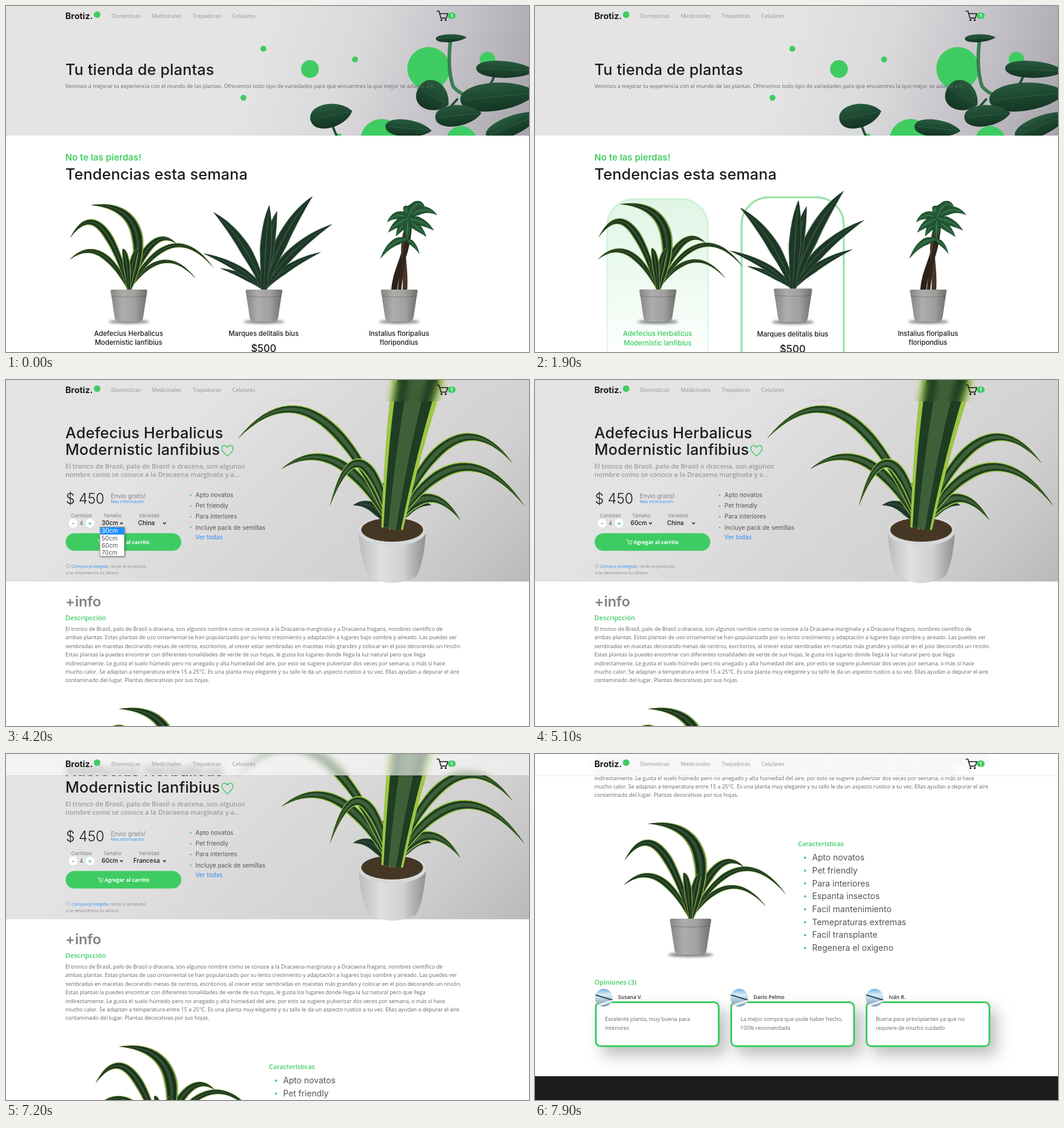
Write an HTML page with a canvas that moves like this. It is 881 by 582 pixels and loops after 8 s.

```html
<!DOCTYPE html>
<html lang="es">
<head>
<meta charset="utf-8">
<title>Tienda de plantas</title>
<style>
html, body { margin: 0; width: 100%; height: 100%; overflow: hidden; background: #fff; }
canvas { display: block; width: 100%; height: 100%; }
</style>
</head>
<body>
<canvas id="stage" width="881" height="582"></canvas>
<script>
const W = 881, H = 582, LOOP = 8000;
const GREEN = '#3ecc62', BLUE = '#2b8ff5', INK = '#1c1c1c', GREY = '#666', PALE = '#8c8c8c';
const screen = document.getElementById('stage').getContext('2d');
let g = screen;

// ---------- helpers ----------
const head = (size, weight = 400) => `${weight} ${size}px Inter, sans-serif`;
const body = (size, weight = 400) => `${weight} ${size}px "Open Sans", sans-serif`;
const clamp = (x, lo = 0, hi = 1) => Math.min(hi, Math.max(lo, x));
const within = (t, a, b) => t >= a && t < b;

function text(str, x, y, font, color, align = 'left') {
  g.font = font;
  g.fillStyle = color;
  g.textAlign = align;
  g.fillText(str, x, y);
}

function title(str, x, y, size, weight, color) {
  g.letterSpacing = '0.2px';
  text(str, x, y, head(size, weight), color);
  g.letterSpacing = '0px';
}

function oval(x, y, rx, ry, color) {
  g.fillStyle = color;
  g.beginPath();
  g.ellipse(x, y, rx, ry, 0, 0, 7);
  g.fill();
}
const disc = (x, y, r, color) => oval(x, y, r, r, color);

function rect(x, y, w, h, color, r = 0) {
  g.fillStyle = color;
  g.beginPath();
  g.roundRect(x, y, w, h, r);
  g.fill();
}

function outline(x, y, w, h, r, color, width) {
  g.strokeStyle = color;
  g.lineWidth = width;
  g.beginPath();
  g.roundRect(x, y, w, h, r);
  g.stroke();
}

function line(path, color, width) {
  g.strokeStyle = color;
  g.lineWidth = width;
  g.lineCap = g.lineJoin = 'round';
  g.stroke(new Path2D(path));
}

function ramp(x0, y0, x1, y1, ...colors) {
  const grad = g.createLinearGradient(x0, y0, x1, y1);
  colors.forEach((c, i) => grad.addColorStop(i / (colors.length - 1), c));
  return grad;
}

function at(x, y, scale, draw) {
  g.save();
  g.translate(x, y);
  g.scale(scale, scale);
  draw();
  g.restore();
}

function layer(height, draw) {
  const c = document.createElement('canvas');
  c.width = W;
  c.height = height;
  g = c.getContext('2d');
  draw();
  g = screen;
  return c;
}

// ---------- plants ----------
const STRIPED = [[1, '#7fa043'], [0.76, '#19321d'], [0.25, '#31502f']];
const VIVID = [[1, '#9dc644'], [0.8, '#1f3d22'], [0.36, '#3d6038']];
const DARK = [[1, '#41604a'], [0.86, '#1d3727'], [0.12, '#34513e']];
const LEAFY = [[1, '#1d4a2c'], [0.75, '#255a36'], [0.1, '#4c8259']];

// Tapered blade from the origin to a tip; lift bends it upward, sway sideways.
function blade(tones, tx, ty, lift = 0, sway = 0, width = 6 + 0.11 * Math.abs(ty)) {
  const bx = 0.25 * tx + sway, cx = 0.6 * tx + sway, cy = ty - lift, by = 0.6 * cy;
  const N = 28, left = [], right = [];
  for (let i = 0; i <= N; i++) {
    const u = i / N, v = 1 - u;
    const point = (b, c, d) => 3 * v * v * u * b + 3 * v * u * u * c + u * u * u * d;
    const slope = (b, c, d) => v * v * b + 2 * v * u * (c - b) + u * u * (d - c);
    const dx = slope(bx, cx, tx), dy = slope(by, cy, ty);
    const half = width / 2 * Math.min(1, 0.4 + 1.5 * u) * (1 - u ** 3) / (Math.hypot(dx, dy) || 1);
    const x = point(bx, cx, tx), y = point(by, cy, ty);
    left.push([x, y, -dy * half, dx * half]);
    right.unshift([x, y, dy * half, -dx * half]);
  }
  for (const [k, color] of tones) {
    g.beginPath();
    [...left, ...right].forEach(([x, y, nx, ny]) => g.lineTo(x + nx * k, y + ny * k));
    g.fillStyle = color;
    g.fill();
  }
}

function dracena() {
  // tip x, tip y, lift, sway
  [[-100, -50, 36], [113, -18, 54], [143, -36, 74], [80, -77, 28],
    [-99, -87, 64], [-64, -142, 3, 50], [17, -68], [-11, -68]]
    .forEach(tip => blade(STRIPED, ...tip));
}

function agave() {
  [[-74, -36], [-102, -61], [96, -63], [115, -110], [-85, -130], [82, -157], [22, -132], [9, -142]]
    .forEach(([x, y]) => blade(DARK, x, y, 0.22 * y));
}

function pachira() {
  line('M-9 4C-6 -40 14 -50 17 -118', '#2c2019', 10);
  line('M9 4C14 -40 -2 -60 15 -112', '#4a3628', 8);
  line('M0 4C4 -40 10 -60 13 -90', '#33251b', 6);
  at(12, -85, 1, () => {
    blade(LEAFY, -44, 33, 30, 0, 13);
    blade(LEAFY, 22, 25, 18, 0, 9);
  });
  at(14, -120, 1, () => {
    for (let i = 0; i < 10; i++) {
      const a = 2.4 + 2.4 * i, r = 40 + 8 * Math.sin(5 * i);
      blade(LEAFY, 10 + r * Math.cos(a), 12 + 0.68 * r * Math.sin(a), 16, 0, 15);
    }
  });
}

function potted(leaves) {
  leaves();
  g.filter = 'blur(2px)';
  oval(0, 54, 34, 3, 'rgba(0,0,0,.55)');
  g.filter = 'none';
  g.fillStyle = ramp(-31, 0, 31, 0, '#858684', '#adaeac', '#a0a19f', '#6d6e6c');
  g.fill(new Path2D('M-31 2Q-31 0 -28 0H28Q31 0 31 2L29 14L24 47Q23 54 14 54H-14Q-23 54 -24 47L-29 14Z'));
  line('M-29 11Q0 14 29 11', 'rgba(60,60,60,.35)', 1);
}

function bigPlant() {
  g.fillStyle = ramp(-57, 0, 57, 0, '#b9bcbc', '#dfe1e1', '#cfd1d1', '#8d9090');
  g.fill(new Path2D('M-57 2C-55 40 -47 68 -39 81Q0 102 40 81C49 66 55 40 57 2Z'));
  oval(0, 4, 57, 25, '#d6d8d8');
  oval(0, 2, 52, 20, '#463626');
  for (let i = -3; i <= 3; i++) blade(DARK, 22 * i, -75 + 4 * i * i, 10, 0, 20);
  [[-187, -100, 55], [-260, -151, 118], [115, -14, 66], [223, -38, 120], [-105, -38, 130], [203, -110, 100]]
    .forEach(tip => blade(VIVID, ...tip, 0, 21));
  blade(VIVID, 130, -420, 0, 0, 92);
}

// Broad pointed leaf with a midrib.
function frond(x, y, len, angle, ratio = 0.5) {
  const r = len / 2, b = len * ratio * 0.68;
  g.save();
  g.translate(x, y);
  g.rotate(angle);
  g.fillStyle = ramp(0, -b, 0, b, '#2c6242', '#1c4630', '#122f1e');
  g.fill(new Path2D(`M${-r} 0C${-r} ${-b} ${r / 2} ${-b} ${r} 0C${r / 2} ${b} ${-r} ${b} ${-r} 0Z`));
  line(`M${-r * 0.85} 0H${r * 0.85}`, 'rgba(90,150,110,.3)', 1);
  g.restore();
}

// ---------- shared parts ----------
function cart(x, y, k, color) {
  at(x, y, k, () => {
    line('M0 0H3.5L7 12.5H16.5L19 4.5H5', color, 1.7);
    disc(8, 16, 1.7, color);
    disc(15.5, 16, 1.7, color);
  });
}

function header() {
  text('Brotiz.', 100, 22, head(14.5, 700), INK);
  disc(153.5, 14.5, 5.5, GREEN);
  let x = 177.5;
  for (const item of ['Domesticas', 'Medicinales', 'Trepadoras', 'Celulares']) {
    text(item, x, 20.4, body(9.07), '#939393');
    x += g.measureText(item).width + 19;
  }
  cart(726, 8.5, 0.95, INK);
  rect(744, 11, 13.5, 10.5, GREEN, 5.2);
  text('1', 750.7, 19.2, body(8, 700), '#fff', 'center');
}

function bullets(items, x, y, pitch, size) {
  items.forEach((s, i) => {
    disc(x, y + pitch * i, size * 0.13, GREEN);
    text(s, x + size * 0.82, y + size * 0.34 + pitch * i, head(size), '#555');
  });
}

// ---------- shop page ----------
const shopHero = layer(218, () => {
  rect(0, 0, W, 218, ramp(430, 40, 900, 190, '#e4e4e4', '#dad9db', '#c3c1c6', '#a5a3a9'));
  [[433.5, 72, 5], [512, 106, 15], [588, 90, 5], [712, 105, 36], [811, 90, 13], [400, 154.5, 5],
    [633, 226, 36], [767, 228, 26], [561, 219, 4.5]].forEach(([x, y, r]) => disc(x, y, r, GREEN));
  line('M547 188Q550 205 558 220', '#2b4a35', 4);
  line('M749 56C744 95 748 120 753 135Q765 150 795 158', '#3b7d51', 6);
  line('M795 158Q815 140 825 112M760 157L735 185', '#245037', 4);
  // centre, length, tilt, aspect
  [[548, 184, 72, -0.2, 0.55], [750, 54, 52, -0.05, 0.25], [720, 152, 58, 0.5, 0.85], [842, 107, 100, 0.05, 0.28],
    [830, 152, 130, -0.1, 0.36], [678, 206, 78, 0.1, 0.36], [762, 184, 78, -0.1, 0.45], [855, 200, 100, -0.4, 0.32]]
    .forEach(f => frond(...f));
});

const cards = [
  { x: 206.5, leaves: dracena, on: 1890, off: LOOP, name: ['Adefecius Herbalicus', 'Modernistic lanfibius'] },
  { x: 434, leaves: agave, on: 1480, off: 1830, name: ['Marques delitalis bius'], price: '$500' },
  { x: 662, leaves: pachira, on: 1085, off: 1380, name: ['Instalius floripalius', 'floripondius'] }
];
const easeOut = x => clamp(x) * (2 - clamp(x));

function card({ x, leaves, on, off, name, price }, t) {
  const over = within(t, on, off), pivot = 515, top = 324 - pivot;
  const h = easeOut((t - on) / 220) - easeOut((t - off) / 220);
  at(x, pivot, 1 + 0.04 * h, () => {
    if (over) rect(-86, top, 172, 380, ramp(0, top, 0, 70, '#e0f5e6', '#edfaf1', '#fdfffd'), 46);
    if (h > 0) outline(-84.5, top + 1.5, 169, 377, 45, `rgba(62,204,98,${clamp(h * 1.15)})`, 3.2);
    name.forEach((s, i) => text(s, 0, 40 + 15.4 * i, head(11.35, 500), over ? GREEN : INK, 'center'));
    if (price) text(price, 0, 67, head(16.8, 500), INK, 'center');
  });
  at(x, pivot, 1 + 0.1 * h, () => {
    g.translate(0.5, 477 - pivot);
    potted(leaves);
  });
}

function shop(t) {
  g.drawImage(shopHero, 0, 0);
  title('Tu tienda de plantas', 100, 116, 25.6, 500, INK);
  text('Venimos a mejorar tu experiencia con el mundo de las plantas. Ofrecemos todo tipo de variedades para que encuentres la que mejor se adapte a ti.',
    100, 138, body(9.07), '#68686a');
  title('No te las pierdas!', 100, 260.3, 14.9, 600, GREEN);
  title('Tendencias esta semana', 100, 291.7, 25.6, 500, INK);
  cards.forEach(c => card(c, t));
  header();
}

// ---------- product page ----------
const about = [
  'El tronco de Brasil, palo de Brasil o dracena, son algunos nombre como se conoce a la Dracaena marginata y a Dracaena fragans, nombres científico de',
  'ambas plantas. Estas plantas de uso ornamental se han popularizado por su lento crecimiento y adaptación a lugares bajo sombre y aireado. Las puedes ver',
  'sembradas en macetas decorando mesas de centros, escritorios, al crecer estar sembradas en macetas más grandes y colocar en el piso decorando un rincón.',
  'Estas plantas la puedes encontrar con diferentes tonalidades de verde de sus hojas, le gusta los lugares donde llega la luz natural pero que llega',
  'indirectamente. Le gusta el suelo húmedo pero no anegado y alta humedad del aire, por esto se sugiere pulverizar dos veces por semana, o más si hace',
  'mucho calor. Se adaptan a temperatura entre 15 a 25°C. Es una planta muy elegante y su tallo le da un aspecto rustico a su vez. Ellas ayudan a depurar el aire',
  'contaminado del lugar. Plantas decorativas por sus hojas.'
];
const traits = ['Apto novatos', 'Pet friendly', 'Para interiores', 'Espanta insectos', 'Facil mantenimiento',
  'Temepraturas extremas', 'Facil transplante', 'Regenera el oxigeno'];
const reviews = [
  ['Susana V.', 'Excelente planta, muy buena para', 'interiores'],
  ['Darío Pelmo', 'La mejor compra que pude haber hecho,', '100% recomendada'],
  ['Iván R.', 'Buena para principiantes ya que no', 'requiere de mucho cuidado']
];

function review([name, ...lines]) {
  g.save();
  g.shadowColor = 'rgba(0,0,0,.25)';
  g.shadowBlur = 24;
  g.shadowOffsetX = 11;
  g.shadowOffsetY = 14;
  rect(0, 0, 210, 77, '#fff', 9);
  g.restore();
  outline(1.5, 1.5, 207, 74, 8, GREEN, 3);
  g.save();
  g.beginPath();
  g.arc(15, -6, 15, 0, 7);
  g.clip();
  rect(0, -21, 30, 30, ramp(0, -21, 0, 9, '#6fb2e2', '#d9edf8', '#a9c3d2', '#7f9fb5'));
  line('M0 -11L30 -2', '#2f4250', 2);
  line('M2 8L30 -1', '#eef5f9', 3);
  g.restore();
  text(name, 39, -4, body(8.8, 600), '#333');
  lines.forEach((s, i) => text(s, 17, 33 + 14.5 * i, body(9.07), GREY));
}

const product = layer(1040, () => {
  rect(0, 0, W, 1040, '#fff');
  rect(0, 0, W, 339, ramp(380, 0, 800, 420, '#e3e3e3', '#dad9da', '#d2d1d1', '#bbbaba'));
  at(650.5, 250, 1, bigPlant);

  title('Adefecius Herbalicus', 100, 97.5, 25.6, 500, INK);
  title('Modernistic lanfibius', 100, 126.3, 25.6, 500, INK);
  line('M373 128C367 123 363.5 119 363.5 115C363.5 109.5 370.5 108.5 373 113.5C375.5 108.5 382.5 109.5 382.5 115C382.5 119 379 123 373 128Z', GREEN, 1.5);
  text('El tronco de Brasil, palo de Brasil o dracena, son algunos', 100, 149, body(11.2, 600), '#9b9c99');
  text('nombre como se conoce a la Dracaena marginata y a...', 100, 163.3, body(11.2, 600), '#9b9c99');
  text('$ 450', 101, 207.8, head(23.6, 300), INK);
  text('Envio gratis!', 176.5, 198.6, head(10.15), '#858585');
  text('Mas información', 176.5, 207, body(7.2), BLUE);
  text('Cantidad', 127, 231, head(8, 500), PALE, 'center');
  text('Tamaño', 179, 231, head(8, 500), PALE, 'center');
  text('Variedad', 241, 231, head(8, 500), PALE, 'center');
  outline(101.3, 310, 6, 6, 3, '#999', 0.7);
  text('Compra protegida', 110, 315.7, body(7.35), BLUE);
  text(', recibi el producto', 110 + g.measureText('Compra protegida').width, 315.7, body(7.35), PALE);
  text('o te devolvemos tu dinero', 100.5, 327, body(7.35), PALE);
  bullets([...traits.slice(0, 3), 'Incluye pack de semillas'], 311, 193.8, 18.1, 10.2);

  text('+info', 100, 381, head(24, 600), '#80857f');
  text('Descripcción', 100, 403.6, body(11.2, 600), GREEN);
  about.forEach((s, i) => text(s, 100, 422 + 14.4 * i, body(9.07), GREY));

  at(262, 713, 1.125, () => potted(dracena));
  text('Caracteristicas', 443, 591, body(10.9, 600), GREEN);
  bullets(traits, 455, 610.4, 21.7, 14.2);

  text('Opiniones (3)', 100, 824, body(11.1, 600), GREEN);
  reviews.forEach((r, i) => at(101 + 228 * i, 852, 1, () => review(r)));
  rect(0, 978, W, 62, INK);
});

function select(label, x, arrow) {
  text(label, x, 244.4, head(10.2, 500), INK);
  line(`M${arrow - 2} 240L${arrow} 242.2L${arrow + 2} 240`, INK, 1.3);
}

function menu(x, w, options, active) {
  g.save();
  g.shadowColor = 'rgba(0,0,0,.35)';
  g.shadowBlur = 3;
  g.shadowOffsetX = g.shadowOffsetY = 1;
  rect(x, 247, w, 50, '#fff');
  g.restore();
  outline(x + 0.5, 247.5, w - 1, 49, 0, '#8a8a8a', 1);
  options.forEach((s, i) => {
    const y = 248 + 12.1 * i, chosen = i === active;
    if (chosen) rect(x + 1, y, w - 2, 12.1, '#1e90ff');
    text(s, x + 3, y + 9.4, head(10.2), chosen ? '#fff' : '#555');
  });
}

function controls(t) {
  const count = 1 + [3600, 3800, 3900].filter(click => t >= click).length;
  disc(113, 241, 7.5, '#fff');
  disc(141.5, 241, 7.5, within(t, 3400, 4000) ? '#d5f3dd' : '#fff');
  line('M111.5 241.5H114.5', '#777', 1);
  line('M139.2 241.5H143.8M141.5 239.2V243.8', GREEN, 1.1);
  text(count, 127, 244.4, head(9), '#555', 'center');

  const pressed = within(t, 4900, 5100) || within(t, 6300, 6400);
  rect(100.5, 257.7, 194.7, 29.5, pressed ? '#38bb59' : GREEN, 14.75);
  cart(154.5, 268.8, 0.47, '#fff');
  text('Agregar al carrito', 166, 276, body(8.7, 700), '#fff');
  text('Ver todas', 319, 268.4, head(10.2), within(t, 6400, 6500) ? '#1463b8' : BLUE);

  select(t < 4900 ? '30cm' : '60cm', 161, 194.5);
  if (t < 6100) select('China', 222.5, 267); else select('Francesa', 214.5, 267);
  if (within(t, 4200, 4900))
    menu(158, 42, ['30cm', '50cm', '60cm', '70cm'], clamp(Math.floor((t - 4200) / 200), 0, 2));
  if (within(t, 5300, 6100))
    menu(210, 62, ['China', 'Italiana', 'Japonesa', 'Francesa'], clamp(Math.floor((t - 5400) / 100), 0, 3));
}

function detail(t) {
  // Two strokes of the wheel
  const y = Math.round(322 * clamp((t - 7130) / 370) + 114 * clamp((t - 7700) / 200));
  g.drawImage(product, 0, -y);
  at(0, -y, 1, () => controls(t));

  // Frosted header bar
  g.save();
  g.beginPath();
  g.rect(0, 0, W, 36);
  g.clip();
  g.filter = 'blur(6px)';
  g.drawImage(product, 0, -y);
  g.restore();
  if (y) {
    rect(0, 0, W, 36, 'rgba(255,255,255,.58)');
    rect(0, 36, W, 1, 'rgba(0,0,0,.07)');
  }
  header();
}

function frame(now) {
  const t = Math.floor((now % LOOP) / 100) * 100;
  rect(0, 0, W, H, '#fff');
  if (t < 2400) shop(t); else detail(t);
  requestAnimationFrame(frame);
}
requestAnimationFrame(frame);
</script>
</body>
</html>
```
